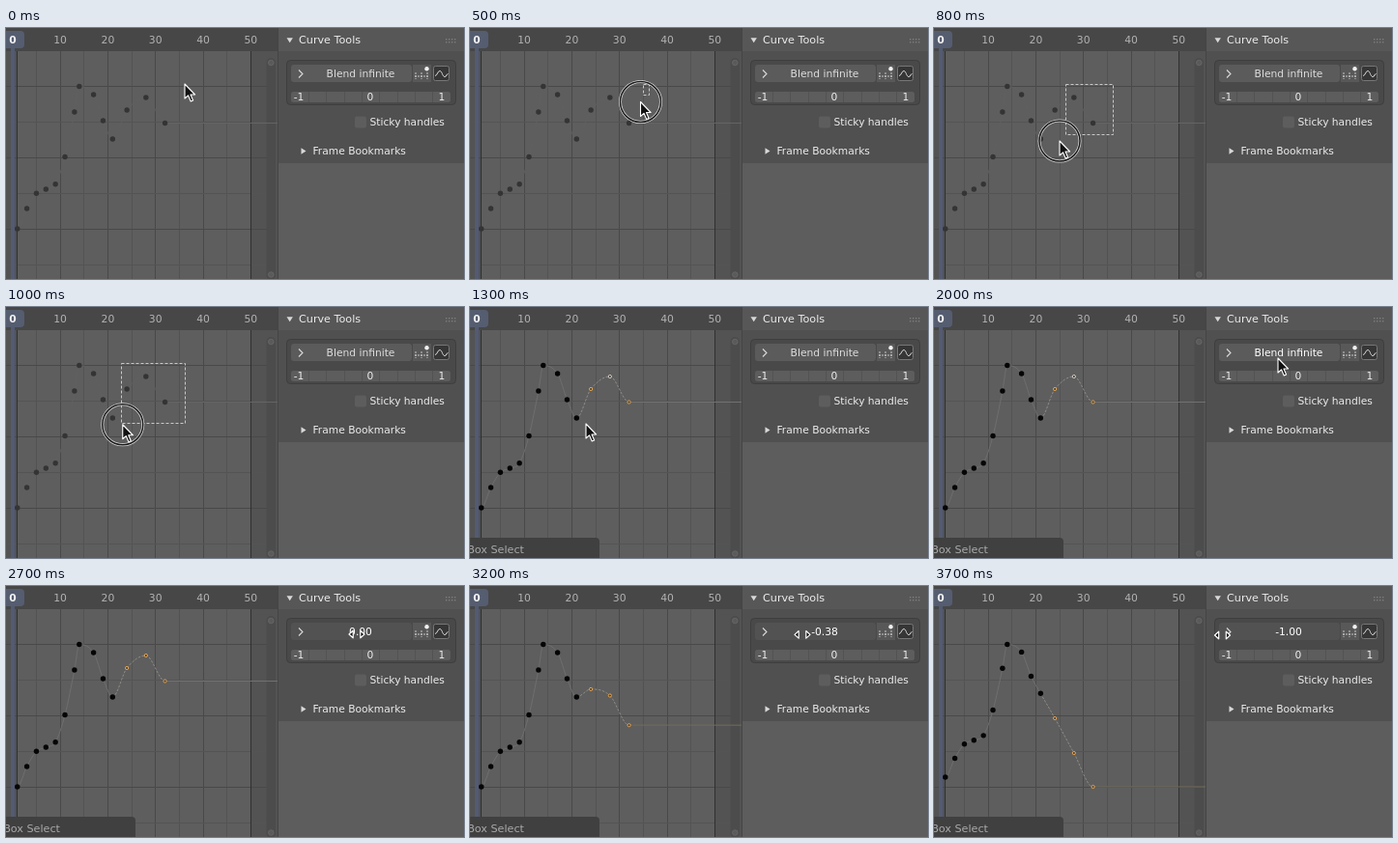
An HTML page for the animation above (3800 ms loop, 474 by 260 pixels).

```html
<!DOCTYPE html>
<html lang="en">
<head>
<meta charset="utf-8">
<title>Curve blending</title>
<style>
html, body { margin: 0; width: 100%; height: 100%; overflow: hidden; background: #5d5d5d; }
svg { display: block; width: 474px; height: 260px; }
text { font-family: "DejaVu Sans", sans-serif; font-size: 10.7px; fill: #ececec; }
.mid { text-anchor: middle; }
.tick { font-size: 10.8px; fill: #b2b2b2; }
</style>
</head>
<body>
<svg id="stage" viewBox="0 0 474 260">
  <rect width="474" height="260" fill="#535353"/>
  <rect x="12" y="24" width="242" height="236" fill="#5e5e5e"/>
  <g id="grid"></g>
  <rect width="282" height="24" fill="#474747"/>
  <g id="ticks"></g>
  <rect x="5" y="20" width="4" height="240" fill="#525b72"/>
  <rect x="-4" y="3" width="23" height="18" rx="4" fill="#555d70"/>
  <text x="7" y="16" class="mid" font-weight="bold" style="fill:#f2f2f2">0</text>
  <rect x="269.5" y="31" width="9.5" height="230" rx="4.7" fill="#4c4c4c"/>
  <g fill="#5a5a5a" stroke="#6a6a6a" stroke-width=".8">
    <circle cx="274.3" cy="36" r="2.8"/><circle cx="274.3" cy="255.5" r="2.8"/>
  </g>

  <g id="curve"></g>
  <g id="status">
    <path d="M0 239H130q4 0 4 4V260H0z" fill="#404040"/>
    <text x="56" y="255" text-anchor="end" style="font-size:11.2px;fill:#a9a9a9">Box Select</text>
  </g>
  <rect id="box" fill="none" stroke="#c8c8c8" stroke-dasharray="3 2"/>

  <rect x="282" width="192" height="260" fill="#5d5d5d"/>
  <rect x="282" width="192" height="140" fill="#505050"/>
  <rect x="282" width="192" height="24" fill="#575757"/>
  <path d="M281.5 0V260" stroke="#454545"/>
  <path d="M290.5 10.2h6.4l-3.2 5z" fill="#d8d8d8"/>
  <text x="303" y="16" style="font-size:11.2px">Curve Tools</text>
  <g id="grip" fill="#7d7d7d"></g>
  <rect x="290.5" y="33.5" width="175" height="46" rx="4" fill="#494949" stroke="#3e3e3e"/>
  <rect id="field" x="295" y="38" width="125" height="18" rx="3"/>
  <path d="M303 43.5l4 4-4 4" fill="none" stroke="#d8d8d8" stroke-width="1.1"/>
  <text id="label" x="367" y="51.2" class="mid"></text>
  <rect x="421" y="38" width="19" height="18" fill="#585858"/>
  <path d="M423 50h15M424 46v7M430 46v7M436 46v7" stroke="#c4c4c4" stroke-dasharray="2 1"/>
  <circle cx="435.5" cy="42.3" r="2.2" fill="#f0f0f0"/>
  <rect x="442.5" y="39.5" width="16" height="15" rx="2" fill="#363636" stroke="#777"/>
  <path d="M444 49.5c2.5 0 2.5-5 5-5s2.5 6 5 6 1.5-3 3.5-3" fill="none" stroke="#ddd"/>
  <rect x="295" y="66" width="165" height="11" rx="2.5" fill="#5d5d5d"/>
  <g id="segments"></g>
  <text x="303" y="75.3" class="mid">-1</text>
  <text x="377" y="75.3" class="mid">0</text>
  <text x="451" y="75.3" class="mid">1</text>
  <rect x="361" y="91.5" width="12" height="12" rx="2" fill="#5d5d5d"/>
  <text x="376.5" y="101.2">Sticky handles</text>
  <path d="M305.5 124.3v6.4l5-3.2z" fill="#d8d8d8"/>
  <text x="317.5" y="131.3">Frame Bookmarks</text>

  <g id="ring" fill="none">
    <circle stroke="#d6d6d6" stroke-width="3"/><circle stroke="#1c1c1c" stroke-width="1.5"/>
  </g>
  <path id="arrow" d="M0 0V15L3.5 11.8L6.2 18L8.6 17L6 11H10.6z" fill="#111" stroke="#fff" stroke-width="1.1" stroke-linejoin="round"/>
  <path id="slide" d="M-8 0l4.2-3.8v7.6zM8 0l-4.2-3.8v7.6z" fill="#111" stroke="#fff" stroke-width="1.2" stroke-linejoin="round"/>
</svg>
<script>
const LOOP = 3800, STEP = 100;
const TOP = 60, BOTTOM = 208;
const $ = id => document.getElementById(id);
const frameX = f => 6.8 + 4.93 * f;
const crisp = v => Math.floor(v) + .5;
const lerp = (a, b, k) => a + (b - a) * k;
const clamp = (v, a, b) => Math.min(b, Math.max(a, v));
const line = (x1, y1, x2, y2, color) =>
  `<path d="M${x1} ${y1}L${x2} ${y2}" stroke="${color}"/>`;

// Keys as [frame, resting y, y when fully blended]
const KEYS = [
  [1, 208], [3, 187], [5, 171.3], [7, 167], [9, 161.7], [11, 133.5], [13, 87],
  [14, 60.5], [17, 69], [19, 96], [21, 115],
  [24, 85, 142.6], [28, 72, 181.2], [32, 98.5, 218.7]
];

// Cursor stops as [time, x, y]
const PATH = [
  [0, 185, 58], [300, 186, 58], [400, 184, 64], [500, 176.5, 76.5], [600, 161, 91],
  [700, 145, 106], [800, 130, 117], [900, 121, 122],
  [1300, 120, 121], [1400, 130, 118], [1500, 164, 108], [1600, 217, 93],
  [1700, 273, 77], [1800, 320, 64], [1900, 347, 56], [2000, 356, 53],
  [2400, 362, 50], [2700, 363, 50], [2900, 362, 50], [3000, 358, 50],
  [3300, 337, 50.5], [3600, 310, 51], [3700, 298.5, 51]
];

function cursorAt(t) {
  const i = PATH.findIndex(p => p[0] >= t);
  if (i <= 0) return PATH[i ? PATH.length - 1 : 0].slice(1);
  const [a, b] = [PATH[i - 1], PATH[i]];
  const k = (t - a[0]) / (b[0] - a[0]);
  return [lerp(a[1], b[1], k), lerp(a[2], b[2], k)];
}

function drawFixed() {
  let grid = "", ticks = "", segments = "", grip = "";
  const column = (f, color) => line(crisp(frameX(f)), 24, crisp(frameX(f)), 260, color);
  for (let f = 5; f < 50; f += 5) grid += column(f, f % 10 ? "#535353" : "#494949");
  for (let i = 0; i < 6; i++)
    grid += line(0, 60.5 + 37 * i, 270, 60.5 + 37 * i, i % 2 ? "#545454" : "#494949");
  grid += column(1, "#303030") + column(50, "#303030");
  for (let f = 10; f <= 50; f += 10)
    ticks += `<text x="${frameX(f)}" y="16" class="mid tick">${f}</text>`;
  for (let i = 1; i < 9; i++) {
    const x = crisp(295 + i * 165 / 9);
    segments += line(x, 66, x, 77, "#535353");
  }
  for (let i = 0; i < 8; i++)
    grip += `<rect x="${455 + i % 4 * 3}" y="${11 + (i >> 2) * 3}" width="1.4" height="1.4"/>`;
  Object.entries({ grid, ticks, segments, grip }).forEach(([id, svg]) => $(id).innerHTML = svg);
}

// Tangents flatten at peaks and at the ends
function slope(p, i) {
  if (!i || i === p.length - 1) return 0;
  const [a, b, c] = [p[i - 1], p[i], p[i + 1]];
  if ((b.y - a.y) * (c.y - b.y) <= 0) return 0;
  return (c.y - a.y) / (c.x - a.x);
}

function segment(p, i) {
  const [a, b] = [p[i], p[i + 1]], h = (b.x - a.x) / 3;
  return `M${a.x} ${a.y}C${a.x + h} ${a.y + h * slope(p, i)} ` +
    `${b.x - h} ${b.y - h * slope(p, i + 1)} ${b.x} ${b.y}`;
}

function drawCurve(value, active, dragging) {
  const raw = KEYS.map(([f, y, end = y]) => ({ x: frameX(f), y: lerp(y, end, -value) }));
  const lowest = Math.max(BOTTOM, ...raw.map(p => p.y));
  const fit = (BOTTOM - TOP) / (lowest - TOP);
  const pts = raw.map(p => ({ x: p.x, y: TOP + (p.y - TOP) * fit }));
  const last = pts[pts.length - 1];
  const tail = !active ? "#646464" : value < 0 ? "#736c58" : "#717171";
  let svg = line(last.x, last.y, 282, last.y, tail);
  for (let i = 0; i < pts.length - 1; i++) {
    const picked = active && i >= 10;
    const color = !active ? "#606060" : picked ? "#8e8c86" : "#6f6f6f";
    svg += `<path d="${segment(pts, i)}" fill="none" stroke="${color}"` +
      `${picked ? ' stroke-dasharray="2.5 1.5"' : ""}/>`;
  }
  pts.forEach((p, i) => {
    const look = active && i >= 11
      ? `r="1.6" fill="#4a443c" stroke="${i === 12 && !dragging ? "#d2cdc4" : "#e6a553"}"`
      : `r="2.7" fill="${active ? "#050505" : "#343434"}"`;
    svg += `<circle cx="${p.x}" cy="${p.y}" ${look}/>`;
  });
  $("curve").innerHTML = svg;
}

function show(id, on) { $(id).style.display = on ? "" : "none"; }

function update(t) {
  const [x, y] = cursorAt(t);
  const active = t >= 1300, dragging = t >= 2700, pressed = t >= 2500;
  const value = dragging ? clamp((x - 363) / 50, -1, 0) : 0;
  drawCurve(value, active, dragging);
  show("status", active);

  const boxing = t >= 500 && t < 1300;
  show("box", boxing);
  if (boxing) {
    const [bx, by] = cursorAt(t - 50).map(crisp);
    const box = { x: bx - 1, y: 58.5, width: 186.5 - bx, height: by - 59.5 };
    for (const k in box) $("box").setAttribute(k, box[k]);
  }

  const ringOn = t >= 400 && t < 1300 || pressed && !dragging;
  show("ring", ringOn);
  const release = clamp((t - 1000) / 200, 0, 1) * (t < 1300);
  for (const c of $("ring").children) {
    c.setAttribute("cx", x);
    c.setAttribute("cy", y);
    c.setAttribute("r", 21 + 2 * release);
  }
  $("ring").setAttribute("opacity", 1 - .6 * release);

  show("arrow", !dragging);
  show("slide", dragging);
  $(dragging ? "slide" : "arrow").setAttribute("transform", `translate(${x} ${y})`);
  $("field").setAttribute("fill", pressed ? "#525252" : "#5b5b5b");
  $("label").textContent = dragging ? value.toFixed(2).replace("-0.00", "0.00") : "Blend infinite";
  $("label").style.fill = t >= 1900 ? "#fff" : "#dedede";
}

drawFixed();
const start = performance.now();
function tick() {
  const t = (performance.now() - start) % LOOP;
  update(Math.floor(t / STEP) * STEP);
  requestAnimationFrame(tick);
}
tick();
</script>
</body>
</html>
```
